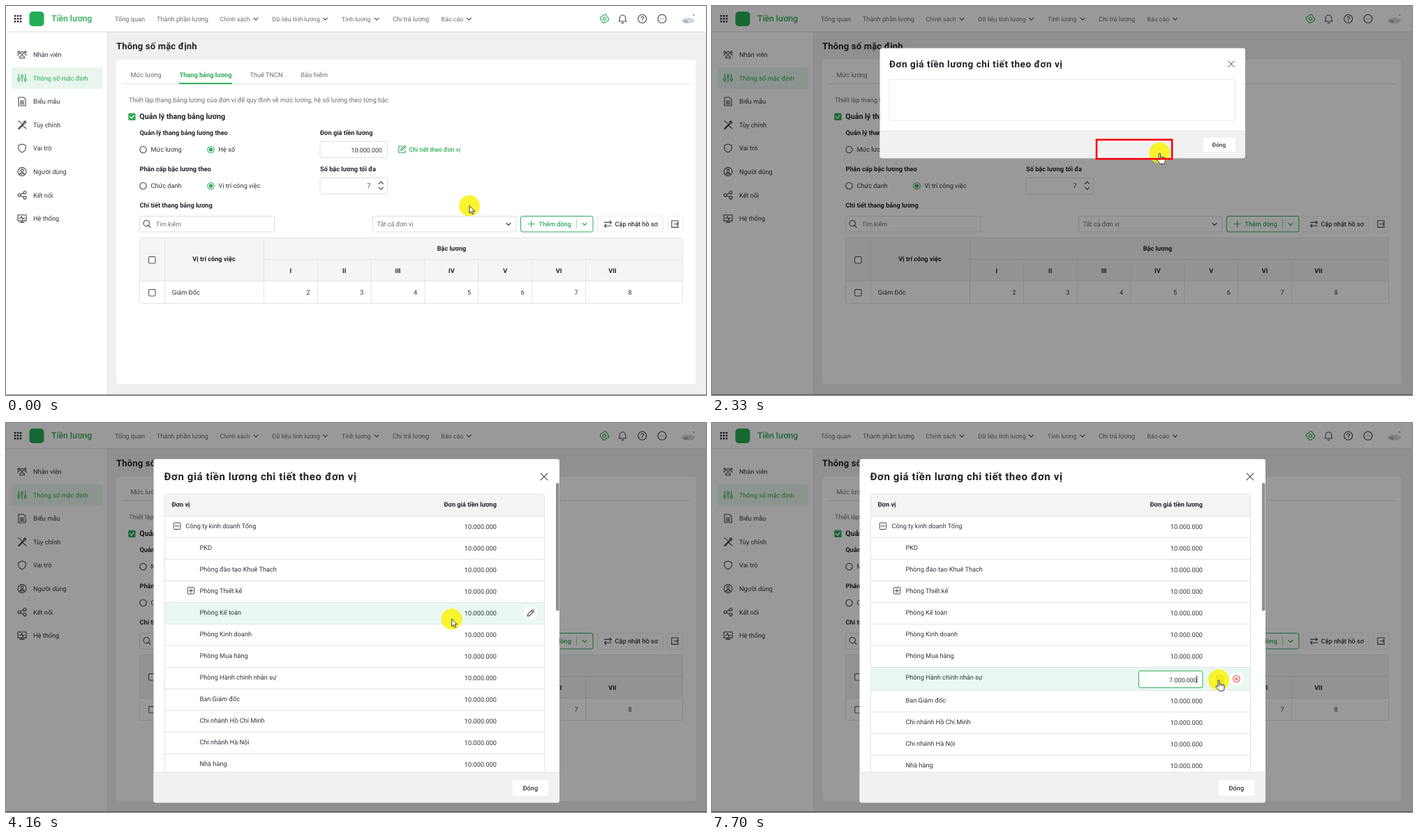
Write an HTML page that moves like this. It is 1003 px wide and 558 px high and loops after 8 s.

```html
<!DOCTYPE html>
<html lang="vi">
<head>
<meta charset="utf-8">
<title>Tiền lương</title>
<style>
html, body { margin: 0; width: 100%; height: 100%; overflow: hidden; background: #fff; }
svg { display: block; width: 1003px; height: 558px; }
text { font-family: Roboto, "Open Sans", sans-serif; font-size: 9.2px; fill: #30343b; text-rendering: geometricPrecision; }
.b { font-weight: 700; fill: #1f2328; }
.m { font-weight: 500; }
.g { fill: #2fab57; }
.muted { fill: #686d75; }
.s { font-size: 8.75px; }
.h1 { font-size: 13px; letter-spacing: .2px; }
.h2 { font-size: 15px; letter-spacing: .6px; }
.h3 { font-size: 10.7px; }
.app { font-size: 12.2px; }
.num { font-size: 8.9px; }
.ico { fill: none; stroke: #41464e; stroke-width: 1.1; stroke-linecap: round; stroke-linejoin: round; }
.green { stroke: #2fab57; }
.box { fill: #fff; stroke: #dcdfe3; }
.line { stroke: #e2e4e7; fill: none; }
</style>
</head>
<body>
<svg id="stage" viewBox="0 0 1003 558" xmlns="http://www.w3.org/2000/svg"></svg>
<script>
const LOOP = 8000;
const ROW_TOP = 133.5, ROW_H = 31, EDIT_ROW = 7;

// ---------- drawing helpers ----------
const text = (x, y, s, cls = '', anchor = 'start') =>
  `<text x="${x}" y="${y}" class="${cls}" text-anchor="${anchor}">${s}</text>`;
const rect = (x, y, w, h, attrs = '') => `<rect x="${x}" y="${y}" width="${w}" height="${h}" ${attrs}/>`;
const field = (x, y, w, h, extra = '') => rect(x, y, w, h, `rx="2.5" class="box" ${extra}`);
const line = (d, extra = '') => `<path class="line" d="${d}" ${extra}/>`;
const icon = (x, y, d, cls = '', extra = '') =>
  `<path class="ico ${cls}" transform="translate(${x} ${y})" d="${d}" ${extra}/>`;
const ring = r => `M${-r} 0a${r} ${r} 0 1 0 ${2 * r} 0a${r} ${r} 0 1 0 ${-2 * r} 0`;
const chevron = (x, y, cls = '', up = 1) => icon(x, y, `M-3 ${-1.5 * up}L0 ${1.5 * up}L3 ${-1.5 * up}`, cls, 'stroke-width="1.3"');
const checkbox = (x, y) => rect(x - 4.7, y - 4.7, 9.4, 9.4, 'rx="1.5" fill="#fff" stroke="#555a62" stroke-width="1.1"');
const radio = (x, y, on) => icon(x, y, ring(4.7), on ? 'green' : '') +
  (on ? `<circle cx="${x}" cy="${y}" r="2.7" fill="#2fab57"/>` : '');

const EDIT = 'M0 -4.5H-4.5V4.7H4.5V1M-1.5 1.8L-1 -.5L4 -5.2L5.3 -3.8L.5 1.2Z';
const PENCIL = 'M-4.3 4.3L-3.6 1.3L2.3 -4.6Q3.3 -5.2 4.3 -4.2Q5.2 -3.3 4.6 -2.3L-1.3 3.6ZM1.2 -3.4L3.4 -1.2';

function header() {
  const dots = [0, 1, 2].flatMap(r => [0, 1, 2].map(c =>
    rect(11.7 + c * 4, 13 + r * 4, 2.6, 2.6, 'rx=".6" fill="#2a2e34"'))).join('');
  const plain = [[156, 'Tổng quan'], [216, 'Thành phần lương'], [554, 'Chi trả lương']]
    .map(([x, s]) => text(x, 21.5, s, 'muted')).join('');
  const menus = [[306.5, 'Chính sách', 358], [381.5, 'Dữ liệu tính lương', 457.5],
    [481, 'Tính lương', 531], [623.5, 'Báo cáo', 663.5]]
    .map(([x, s, c]) => text(x, 22, s, 'muted s') + chevron(c, 18.7)).join('');
  const gear = Array.from({length: 17}, (_, i) => {
    const a = i * Math.PI / 8, r = i % 4 < 2 ? 6.2 : 5;
    return `${i ? 'L' : 'M'}${(r * Math.cos(a)).toFixed(2)} ${(r * Math.sin(a)).toFixed(2)}`;
  }).join('') + ring(2);
  return rect(0, 0, 1003, 37, 'fill="#fff"') + rect(0, 36.5, 1003, 1.2, 'fill="#dcdddf"') + dots +
    rect(33.5, 8, 21, 21, 'rx="5" fill="#23ad55"') +
    text(65, 22, 'Tiền lương', 'app m g', 'start') + plain + menus +
    icon(857.5, 18.3, gear, 'green') +
    icon(883.5, 18.5, 'M-5.3 3.5Q-4 2 -4 -1.5A4 4 0 0 1 4 -1.5Q4 2 5.3 3.5ZM-1.5 5.5Q0 6.8 1.5 5.5') +
    icon(911.7, 18.3, ring(6) + 'M-1.7 -1.5A1.8 1.8 0 1 1 .6 .2Q0 .5 0 1.5M0 3.2V3.3') +
    icon(940, 18.3, ring(6) + 'M-2.7 0h.1M0 0h.1M2.7 0h.1') +
    '<ellipse cx="977.5" cy="21" rx="9.5" ry="4" fill="#d3d8dd"/><ellipse cx="974" cy="22" rx="3" ry="2" fill="#a9b0b8"/><circle cx="985.5" cy="13" r="1" fill="#777"/>';
}

function sidebar() {
  const items = [
    ['Nhân viên', 'M-2 -2.5a2 2 0 1 0 4 0a2 2 0 1 0 -4 0M-3.5 5Q-3.5 1.5 0 1.5T3.5 5ZM-6 -3.7a1.3 1.3 0 1 0 2.6 0a1.3 1.3 0 1 0 -2.6 0M3.4 -3.7a1.3 1.3 0 1 0 2.6 0a1.3 1.3 0 1 0 -2.6 0M-6.3 1Q-6 -.7 -4 -.7M6.3 1Q6 -.7 4 -.7'],
    ['Thông số mặc định', 'M-4.7 -5.5V0M-4.7 3.5V5.5M0 -5.5V-4M0 -.5V5.5M4.7 -5.5V.5M4.7 4V5.5M-6.2 1.7a1.5 1.5 0 1 0 3 0a1.5 1.5 0 1 0 -3 0M-1.5 -2.3a1.5 1.5 0 1 0 3 0a1.5 1.5 0 1 0 -3 0M3.2 2.2a1.5 1.5 0 1 0 3 0a1.5 1.5 0 1 0 -3 0'],
    ['Biểu mẫu', 'M-5 -6H2L5 -3V6H-5ZM-2.5 -1H2.5M-2.5 1.2H2.5M-2.5 3.4H2.5'],
    ['Tùy chỉnh', 'M-5.5 5.5L2 -2Q1.5 -5 4.5 -5.8L3.5 -3.5L5.8 -4.5Q5.5 -1.5 2.5 -1.2L-4 6ZM-5.5 -5.5L-3 -4.5L0 -1M1.5 1.5L5.8 5.3'],
    ['Vai trò', 'M0 -6L5.2 -4V0Q5 4 0 6Q-5 4 -5.2 0V-4Z'],
    ['Người dùng', ring(6) + 'M-1.8 -1.7a1.8 1.8 0 1 0 3.6 0a1.8 1.8 0 1 0 -3.6 0M-3.3 3.3Q-3 1.3 0 1.3T3.3 3.3Z'],
    ['Kết nối', 'M-6 0a2 2 0 1 0 4 0a2 2 0 1 0 -4 0M2 -3.7a2 2 0 1 0 4 0a2 2 0 1 0 -4 0M2 3.7a2 2 0 1 0 4 0a2 2 0 1 0 -4 0M-2.2 -.9L2.2 -2.9M-2.2 .9L2.2 2.9'],
    ['Hệ thống', 'M-6 -5H6V3.3H-6ZM-3 5.6H3M0 3.3V5.6M-4 -.6H-2L-.7 -3L1 1.5L2 -.6H4']
  ];
  return rect(0, 37.7, 145.5, 520, 'fill="#fff"') + line('M145.5 38V557') +
    rect(8, 88, 130, 31, 'rx="4" fill="#e8f6ed"') +
    items.map(([s, d], i) => {
      const y = 69.8 + i * 33.57, on = i === 1;
      return icon(23, y, d, on ? 'green' : '') + text(39, y + 3.3, s, on ? 'g' : '');
    }).join('');
}

function settings() {
  const cols = Array.from({length: 7}, (_, i) => 369.5 + i * 76.85);
  const romans = ['I', 'II', 'III', 'IV', 'V', 'VI', 'VII'];
  const table = rect(191.5, 332.5, 778, 94, 'rx="2" fill="#fff"') +
    rect(191.5, 332.5, 778, 62, 'fill="#f4f5f6"') +
    line(`M191.5 394.5H969.5M369.5 363.5H969.5M227.5 332.5V426.5M369.5 332.5V426.5` +
      cols.slice(1).map(x => `M${x} 363.5V426.5`).join('')) +
    rect(191.5, 332.5, 778, 94, 'rx="2" class="line"') +
    checkbox(209.3, 364.3) + checkbox(209.3, 411.3) +
    text(298, 366.2, 'Vị trí công việc', 'b', 'middle') + text(638.5, 350.8, 'Bậc lương', 'b', 'middle') +
    cols.map((x, i) => text(x + 38.3, 382.5, romans[i], 'b', 'middle') + text(x + 66, 414.2, i + 2, '', 'end')).join('') +
    text(237.7, 414, 'Giám Đốc');
  return text(158, 62, 'Thông số mặc định', 'b h1') + rect(158, 77, 830, 465, 'rx="4" fill="#fff"') +
    line('M166 111.5H980') + rect(248, 110.2, 76, 2, 'fill="#2fab57"') +
    text(178.5, 101.5, 'Mức lương', 'muted') + text(248.5, 101.5, 'Thang bảng lương', 'b g" style="fill:#2fab57') +
    text(349.5, 101.5, 'Thuế TNCN', 'muted') + text(422.5, 101.5, 'Bảo hiểm', 'muted') +
    text(176, 137.6, 'Thiết lập thang bảng lương của đơn vị để quy định về mức lương, hệ số lương theo từng bậc', 'muted') +
    rect(175.3, 153.7, 10.3, 10.3, 'rx="1.5" fill="#2fab57"') +
    icon(180.4, 159, 'M-2.7 0L-.7 2L2.9 -2', '', 'style="stroke:#fff;stroke-width:1.3"') +
    text(191.3, 162, 'Quản lý thang bảng lương', 'b h3') +
    text(191.5, 184.7, 'Quản lý thang bảng lương theo', 'b') +
    radio(196.5, 206) + text(207.5, 209.2, 'Mức lương') + radio(293.5, 206, true) + text(304.5, 209.2, 'Hệ số') +
    text(191.5, 237, 'Phân cấp bậc lương theo', 'b') +
    radio(196.5, 258) + text(207.5, 261.2, 'Chức danh') + radio(293.5, 258, true) + text(304.5, 261.2, 'Vị trí công việc') +
    text(191.5, 289.3, 'Chi tiết thang bảng lương', 'b') +
    text(450, 184.7, 'Đơn giá tiền lương', 'b') + field(450, 194.5, 96.5, 23) + text(539, 209.6, '10.000.000', 'num', 'end') +
    rect(553, 194, 104, 23.5, 'id="linkHover" rx="2" fill="#e8f7ee"') +
    icon(567.3, 205.5, EDIT, 'green') + text(577.5, 208.8, 'Chi tiết theo đơn vị', 's m g') +
    text(450, 237, 'Số bậc lương tối đa', 'b') + field(450, 246.5, 96.5, 23) + text(522.3, 261.2, '7', '', 'end') +
    chevron(537.5, 253.5, '', -1) + chevron(537.5, 261.7) +
    field(191.5, 301.5, 193, 22.5) + icon(202, 312.5, 'M-5 -.8a4.2 4.2 0 1 0 8.4 0a4.2 4.2 0 1 0 -8.4 0M2.3 2.3L5 5') +
    text(215, 315.8, 'Tìm kiếm', 's muted') +
    field(525.5, 301.5, 205.5, 22.5) + text(531.5, 315.5, 'Tất cả đơn vị', 'muted') + chevron(720, 313) +
    field(737.5, 301.5, 103.5, 22.5, 'style="stroke:#2fab57"') + icon(752.7, 312.7, 'M-4.5 0H4.5M0 -4.5V4.5', 'green', 'stroke-width="1.3"') +
    text(763.3, 316, 'Thêm dòng', 'm g') + line('M817.5 306V319', 'style="stroke:#a5dab7"') + chevron(829, 313, 'green') +
    field(847, 301.5, 94.5, 22.5, 'style="stroke:#ebecee"') +
    icon(862.5, 312.7, 'M-5 -2.3H5M2.7 -4.6L5 -2.3L2.7 0M5 2.5H-5M-2.7 .2L-5 2.5L-2.7 4.8') +
    text(872.5, 316, 'Cập nhật hồ sơ', 'm') +
    field(947.5, 301.5, 22.5, 22.5, 'style="stroke:#ebecee"') +
    icon(958.5, 312.7, 'M4.7 -2.5V-4.7H-4.7V4.7H4.7V2.5M-1.5 0H5M3 -2L5 0L3 2') + table;
}

const dialogFrame = (footerY, closeRight) =>
  rect(211.5, 51.8, 581.5, footerY - 8.2, 'rx="3" fill="#fff"') +
  `<path d="M211.5 ${footerY}H793V${footerY + 40.6}q0 3 -3 3H214.5q-3 0 -3 -3Z" fill="#f1f1f1"/>` +
  line(`M211.5 ${footerY}H793`, 'style="stroke:#e6e6e6"') +
  text(226.5, 82, 'Đơn giá tiền lương chi tiết theo đơn vị', 'b h2') +
  icon(771, 77, 'M-4.8 -4.8L4.8 4.8M4.8 -4.8L-4.8 4.8', '', 'stroke-width="1.2"') +
  rect(726, footerY + 11.2, 51, 22.3, 'rx="2.5" fill="#fff"') + text(751.3, footerY + 25.6, 'Đóng', 'm', 'middle');

function dialogRows() {
  const names = ['Công ty kinh doanh Tổng', 'PKD', 'Phòng đào tạo Khuê Thạch', 'Phòng Thiết kế', 'Phòng Kế toán',
    'Phòng Kinh doanh', 'Phòng Mua hàng', 'Phòng Hành chính nhân sự', 'Ban Giám đốc',
    'Chi nhánh Hồ Chí Minh', 'Chi nhánh Hà Nội', 'Nhà hàng'];
  const tree = (x, y, plus) => rect(x - 4.7, y - 4.7, 9.4, 9.4, 'rx="1" fill="#fff" stroke="#41464e"') +
    icon(x, y, 'M-2.5 0H2.5' + (plus ? 'M0 -2.5V2.5' : ''));
  const rows = names.map((name, i) => {
    const y = ROW_TOP + i * ROW_H;
    return line(`M227.5 ${y}H771.5`) + text(i ? 277.5 : 257.5, y + 17.1, name, '', 'start') +
      (i === 0 ? tree(245, y + 14.3) : i === 3 ? tree(265, y + 14, true) : '') +
      `<g ${i === EDIT_ROW ? 'id="editPrice"' : ''}>${text(703, y + 18.6, '10.000.000', '', 'end')}</g>`;
  });
  return rows.slice(0, 8).join('') + `<g id="lowerRows">${rows.slice(8).join('')}</g>`;
}

const editor = () =>
  rect(611.5, 355.7, 91.5, 24, 'rx="2" fill="#fff" stroke="#2fab57"') +
  rect(650, 362.7, 44.7, 10.6, 'id="selection" fill="#3390ff"') +
  '<text id="price" class="num" x="694.7" y="371.5" text-anchor="end"></text>' +
  rect(694.3, 362.3, .9, 11, 'id="caret" fill="#222"') +
  [728, 751.5].map(x => `<circle cx="${x}" cy="367" r="10" fill="#fff"/>`).join('') +
  icon(728, 367, 'M-4.5 -4.5H2.5L4.5 -2.5V4.5H-4.5ZM-2.5 -4.5V-1.5H2V-4.5M-2.5 4.5V1H2.5V4.5', 'green') +
  icon(751.5, 367, ring(4.8) + 'M-1.7 -1.7L1.7 1.7M1.7 -1.7L-1.7 1.7', '', 'style="stroke:#ee4a4a"');

const stage = document.getElementById('stage');
stage.innerHTML = `
  <clipPath id="bodyClip"><rect x="211" y="86" width="582" height="415"/></clipPath>
  ${rect(0, 0, 1003, 558, 'fill="#f0f0f2"')}
  ${header()}${sidebar()}${settings()}
  ${rect(0, 557, 1003, 1, 'fill="#8c8c8c"')}
  <rect id="backdrop" width="1003" height="558" fill="#000" opacity=".4"/>
  <g id="emptyDialog">${dialogFrame(183.4)}${field(226.5, 101.5, 550.5, 65.3, 'style="stroke:#e6e6e6"')}</g>
  <g id="fullDialog">${dialogFrame(501)}
    <g clip-path="url(#bodyClip)">
      <path d="M227.5 133.5V105q0 -3 3 -3H768.5q3 0 3 3V133.5Z" fill="#f4f4f5"/>
      ${text(237.5, 120.3, 'Đơn vị', 'b')}${text(703, 120.3, 'Đơn giá tiền lương', 'b', 'end')}
      ${rect(227.5, 0, 544, ROW_H, 'id="rowHover" fill="#e9f9f2"')}
      ${dialogRows()}
      <path class="line" d="M227.5 510V105q0 -3 3 -3H768.5q3 0 3 3V510"/>
      <g id="pencil"><circle r="10" fill="#fff"/><path class="ico" d="${PENCIL}"/></g>
      <g id="editor">${editor()}</g>
    </g>
    ${rect(788, 86, 4.6, 183.5, 'rx="2" fill="#909194"')}
  </g>
  <g id="cursor">
    <circle r="15" fill="#fbf300" opacity=".82"/>
    <path id="arrow" d="M0 0V10.6L2.5 8.4L4.2 12.2L6 11.4L4.4 7.7H7.6Z" fill="#fff" stroke="#222" stroke-width=".9"/>
    <path id="hand" d="M-1 1Q0 -.3 1.2 1V6Q2.6 5 3.7 6.2Q5 5.6 5.9 6.8Q7.6 6.2 8 8V11.5Q8 14 6.6 15.8H.4Q-1 13 -4 10Q-4.2 8 -2.4 8.6L-1 10ZM1.2 6V9M3.7 6.4V9M5.9 7V9" fill="#fff" stroke="#222" stroke-width=".9" stroke-linejoin="round"/>
  </g>
  <rect id="frame" x="551" y="191.8" width="108.2" height="27.5" fill="none" stroke="#f8060e" stroke-width="2.6"/>`;

const el = Object.fromEntries([...stage.querySelectorAll('[id]')].map(n => [n.id, n]));
const show = (node, on) => node.setAttribute('display', on ? 'inline' : 'none');

// ---------- motion ----------
const clamp = u => Math.max(0, Math.min(1, u));
const span = (t, a, b) => clamp((t - a) / (b - a));
const smooth = u => u * u * (3 - 2 * u);
const easeOut = n => u => 1 - (1 - u) ** n;

// [time, x, y, easing towards this point]
const path = [
  [0, 664, 286.5], [530, 664, 286.5], [1630, 642, 212, u => smooth(u * u)], [1830, 642, 212], [1830, 641.3, 210.7],
  [3800, 641.3, 210.7], [4160, 638.7, 281], [4830, 623, 352, easeOut(1.75)], [5310, 623, 352], [5330, 631.7, 354],
  [5560, 753, 368.5, easeOut(1.3)], [5660, 748, 365, smooth], [6300, 748, 365], [6300, 767, 377],
  [7430, 767, 377], [7430, 750, 365], [7700, 726, 368.5, smooth], [LOOP, 726, 368.5]
];

function cursorAt(t) {
  const i = path.findIndex(k => k[0] > t);
  const [t0, x0, y0] = path[i - 1], [t1, x1, y1, ease = u => u] = path[i];
  const u = ease(span(t, t0, t1));
  return [x0 + (x1 - x0) * u, y0 + (y1 - y0) * u];
}

function priceAt(t) {
  if (t < 6560) return '10.000.000';
  const digits = Math.min(7, 1 + Math.floor((t - 6560) / 77));
  return '7000000'.slice(0, digits).replace(/\B(?=(\d{3})+$)/g, '.');
}

function update(t) {
  const [x, y] = cursorAt(t);
  const opened = t >= 2330, loaded = t >= 3100, editing = t >= 6000;

  show(el.linkHover, !opened && y < 218);
  show(el.backdrop, opened);
  show(el.emptyDialog, opened && !loaded);
  show(el.fullDialog, loaded);
  const scale = .9 + .1 * easeOut(2)(span(t, 2335, 2430));
  el.emptyDialog.setAttribute('transform', `translate(502.2 139.3) scale(${scale}) translate(-502.2 -139.3)`);
  el.frame.setAttribute('opacity', span(t, 215, 540) * (1 - span(t, 2335, 2640)));

  const row = editing ? EDIT_ROW : Math.floor((y - ROW_TOP) / ROW_H);
  const rowY = ROW_TOP + row * ROW_H;
  el.rowHover.setAttribute('y', rowY);
  el.rowHover.setAttribute('height', editing ? ROW_H + 2 : ROW_H);
  el.pencil.setAttribute('transform', `translate(751.5 ${rowY + 15.3})`);
  el.lowerRows.setAttribute('transform', `translate(0 ${editing ? 2 : 0})`);
  show(el.pencil, !editing);
  show(el.editPrice, !editing);
  show(el.editor, editing);

  const selected = t >= 6100 && t < 6560;
  show(el.selection, selected);
  el.price.textContent = priceAt(t);
  el.price.style.fill = selected ? '#fff' : '';
  show(el.caret, !selected && (t < 7060 || t >= 7560));

  const hand = (t < 3830 && y < 218) || (t >= 5500 && t < 6300) || t >= 7430;
  el.cursor.setAttribute('transform', `translate(${x} ${y})`);
  show(el.cursor, t < 6560 || t >= 7430);
  show(el.hand, hand);
  show(el.arrow, !hand);
}

const start = performance.now();
function tick() {
  update((performance.now() - start) % LOOP);
  requestAnimationFrame(tick);
}
update(0);
tick();
</script>
</body>
</html>
```
